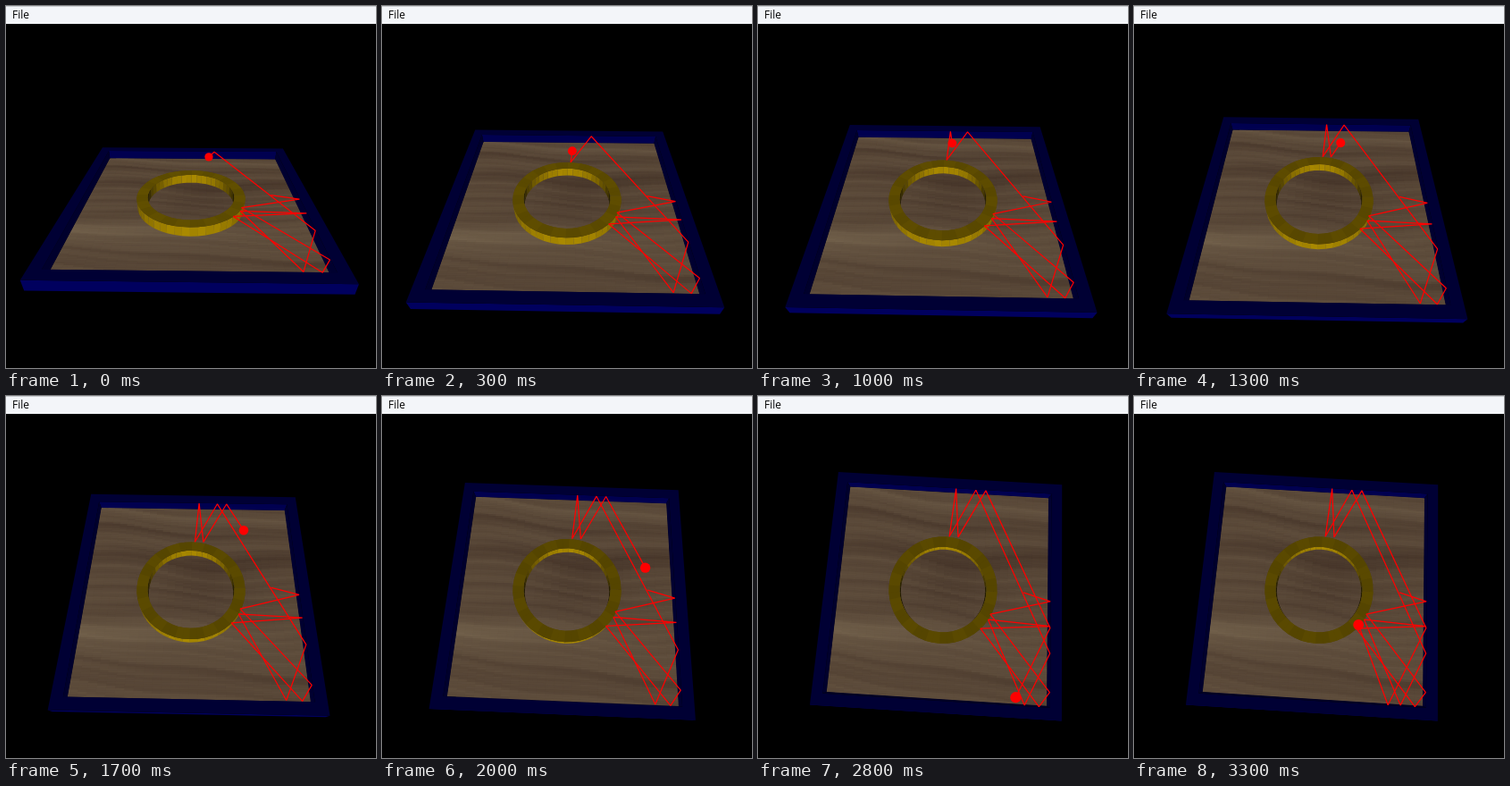
These frames come from a looping animation (414x405 px, 3400 ms). An HTML page with a canvas:

```html
<!DOCTYPE html>
<html lang="en">
<head>
<meta charset="utf-8">
<title>Ball in a tray</title>
<style>
  html, body { margin: 0; width: 100%; height: 100%; overflow: hidden; background: #000; }
  canvas { position: absolute; left: 0; top: 0; }
  .menu {
    position: absolute; left: 0; top: 0; width: 414px; height: 20px; box-sizing: border-box;
    border-top: 1px solid #c9ccd0; background: #f3f5f9; color: #000;
    font: 12px/18px "Open Sans", "Noto Sans", sans-serif; padding-left: 7px;
  }
</style>
</head>
<body>
<canvas id="view" width="414" height="405"></canvas>
<div class="menu">File</div>
<script>
const ctx = document.getElementById('view').getContext('2d');
const LOOP = 3400, STEP = 100;
const CX = 207, CY = 216.5, DIST = 366;
const INNER = 118.5, OUTER = 130.5, FLOOR = -5, TOP = 6.5, BALL_Z = 6;
const RING_IN = 47.8, RING_OUT = 59.6, RING_TOP = 6, SEGMENTS = 48;

// time, camera pitch, board turn (degrees), distance the ball has rolled
const KEYS = [
  [0, 32, 0.9, 19], [200, 40.1, 1, 65], [300, 44.2, 1, 88], [500, 46.5, 1, 128],
  [800, 50.3, 1, 189], [900, 53.6, 1, 209], [1300, 63.7, 1.1, 291],
  [1400, 65.3, 1.3, 310], [1800, 79, 3.3, 385], [2000, 80.5, 3.5, 423], [2900, 80.5, 3.5, 596.6]
];

// bounces made before the loop starts, then those the ball runs through
const PAST = [[88.5, 1], [118, -7], [53, -25], [118, -103], [107, -118], [43, -41],
  [118, -34], [51, -31], [92, -117.5], [118, -63]];
const ROUTE = [[31, 118], [3.5, 60], [8, 118.5], [13.5, 60], [42.5, 118],
  [118, -36], [79, -118], [45, -37]];

let cam;

function pose(t) {
  let i = 1;
  while (i < KEYS.length - 1 && KEYS[i][0] < t) i++;
  const a = KEYS[i - 1], b = KEYS[i], f = Math.min(1, (t - a[0]) / (b[0] - a[0]));
  return a.map((v, n) => v + (b[n] - v) * f);
}

// The run slips back once and stalls twice.
function runTime(t) {
  if (t < 600) return t;
  if (t === 2300 || t === 3200) t -= STEP;
  return t - 400;
}

function setCamera(pitch, turn) {
  const p = pitch * Math.PI / 180, w = turn * Math.PI / 180;
  cam = { s: Math.sin(p), c: Math.cos(p), ts: Math.sin(w), tc: Math.cos(w) };
}

function project(x, y, z) {
  const { s, c, ts, tc } = cam;
  const px = x * tc + y * ts, py = y * tc - x * ts;
  const k = DIST / (DIST + py * c - z * s);
  return [CX + px * k, CY - (py * s + z * c) * k, k];
}

function trace(points) {
  points.forEach((p, i) => i ? ctx.lineTo(p[0], p[1]) : ctx.moveTo(p[0], p[1]));
}

function fill(points, color) {
  ctx.beginPath();
  trace(points);
  ctx.closePath();
  ctx.fillStyle = color;
  ctx.fill();
}

const square = (r, z) => [[-r, r], [r, r], [r, -r], [-r, -r]].map(([x, y]) => project(x, y, z));

const bump = (x, w) => Math.exp(-x * x / (w * w));

function woodColor(u, v) {
  const knot = Math.exp(-(((u - 0.08) / 0.45) ** 2) - (v / 0.24) ** 2);
  const w = v + 0.05 * Math.sin(1.9 * u + 0.6) + 0.025 * Math.sin(4.3 * u + 3 * v) + 0.3 * v * knot;
  let l = 0.55 * bump(w + 0.47, 0.14) * (1 - 0.5 * u) + 0.3 * bump(w - 0.9, 0.08);
  l -= 0.6 * bump(w - 0.36, 0.12) * (0.8 + 0.3 * u) + 0.45 * bump(w - 0.7, 0.05);
  l -= 0.4 * knot + 0.4 * bump(w + 0.78, 0.05) * (0.6 + 0.4 * u);
  l += 0.14 * Math.sin(w * 29 + 2 * Math.sin(w * 8 + u)) + 0.1 * Math.sin(w * 71 + 2 * u);
  l += 0.06 * Math.sin(w * 133 + 3 * u);
  return `rgb(${90 + 22 * l | 0},${73 + 22 * l | 0},${57 + 17 * l | 0})`;
}

const ROWS = 110, COLS = 26;
const wood = Array.from({ length: ROWS * COLS }, (_, i) =>
  woodColor(2 * (i % COLS + 0.5) / COLS - 1, 1 - 2 * ((i / COLS | 0) + 0.5) / ROWS));

function drawFloor() {
  const grid = [];
  for (let r = 0; r <= ROWS; r++) {
    for (let c = 0; c <= COLS; c++) {
      grid.push(project(INNER * (2 * c / COLS - 1), INNER * (1 - 2 * r / ROWS), FLOOR));
    }
  }
  const at = (r, c) => grid[Math.min(r, ROWS) * (COLS + 1) + Math.min(c, COLS)];
  // each patch overlaps the next so that no seams show
  for (let r = 0; r < ROWS; r++) {
    for (let c = 0; c < COLS; c++) {
      fill([at(r, c), at(r, c + 2), at(r + 2, c + 2), at(r + 2, c)], wood[r * COLS + c]);
    }
  }
}

function drawTray() {
  const outTop = square(OUTER, TOP), outLow = square(OUTER, FLOOR);
  const inTop = square(INNER, TOP), inLow = square(INNER, FLOOR);
  fill([outTop[2], outTop[3], outLow[3], outLow[2]], '#00005e');
  drawFloor();
  ['#000050', '#000030', '#000024', '#00002c'].forEach((color, i) => {
    const j = (i + 1) % 4;
    fill([inTop[i], inTop[j], inLow[j], inLow[i]], color);
  });
  ctx.beginPath();
  for (const loop of [outTop, inTop]) {
    trace(loop);
    ctx.closePath();
  }
  ctx.fillStyle = '#000034';
  ctx.fill('evenodd');
}

const gold = v => `rgb(${v | 0},${v * 0.81 | 0},0)`;

function facing(q) {
  let area = 0;
  q.forEach((p, i) => {
    const n = q[(i + 1) % q.length];
    area += p[0] * n[1] - n[0] * p[1];
  });
  return area < 0;
}

function drawRing() {
  const loop = (r, z) => Array.from({ length: SEGMENTS + 1 }, (_, i) => {
    const a = i * 2 * Math.PI / SEGMENTS;
    return project(r * Math.cos(a), r * Math.sin(a), z);
  });
  const inTop = loop(RING_IN, RING_TOP), inLow = loop(RING_IN, FLOOR);
  const outTop = loop(RING_OUT, RING_TOP), outLow = loop(RING_OUT, FLOOR);
  const side = (top, low, sign) => {
    for (let i = 0; i < SEGMENTS; i++) {
      const j = i + 1, ny = sign * Math.sin((i + 0.5) * 2 * Math.PI / SEGMENTS);
      const q = sign > 0 ? [low[i], low[j], top[j], top[i]] : [low[j], low[i], top[i], top[j]];
      const base = sign > 0 ? 88 : 30;
      if (facing(q)) fill(q, gold(base + (164 - base) * Math.max(0, -ny) + i % 2 * 6));
    }
  };
  side(inTop, inLow, -1);
  side(outTop, outLow, 1);
  const flat = 102 - 17 * cam.s;
  for (let i = 0; i < SEGMENTS; i++) {
    const j = i + 1, n = Math.min(i + 2, SEGMENTS);
    const last = j === SEGMENTS ? j : n;
    fill([inTop[i], outTop[i], outTop[j], outTop[last], inTop[last], inTop[j]],
      gold(flat + (i >> 1) % 2 * 5));
  }
}

function rolled(dist) {
  const points = [ROUTE[0]];
  for (let i = 1; i < ROUTE.length; i++) {
    const [ax, ay] = ROUTE[i - 1], [bx, by] = ROUTE[i];
    const len = Math.hypot(bx - ax, by - ay), f = Math.min(1, dist / len);
    points.push([ax + (bx - ax) * f, ay + (by - ay) * f]);
    if (dist <= len) break;
    dist -= len;
  }
  return points;
}

function drawTrail(dist) {
  const points = PAST.concat(rolled(dist)).map(([x, y]) => project(x, y, BALL_Z));
  ctx.beginPath();
  trace(points);
  ctx.strokeStyle = ctx.fillStyle = '#f00';
  ctx.lineWidth = 1.25;
  ctx.lineJoin = 'bevel';
  ctx.stroke();
  const [x, y, k] = points[points.length - 1];
  ctx.beginPath();
  ctx.arc(x, y, 5.7 * k, 0, 2 * Math.PI);
  ctx.fill();
}

function draw(t) {
  const [, pitch, turn, dist] = pose(runTime(t));
  setCamera(pitch, turn);
  ctx.fillStyle = '#000';
  ctx.fillRect(0, 0, 414, 405);
  drawTray();
  drawRing();
  drawTrail(dist);
}

let shown = -1;
const start = performance.now();

function tick() {
  const t = Math.floor((performance.now() - start) % LOOP / STEP) * STEP;
  if (t !== shown) draw(shown = t);
  requestAnimationFrame(tick);
}
tick();
</script>
</body>
</html>
```
